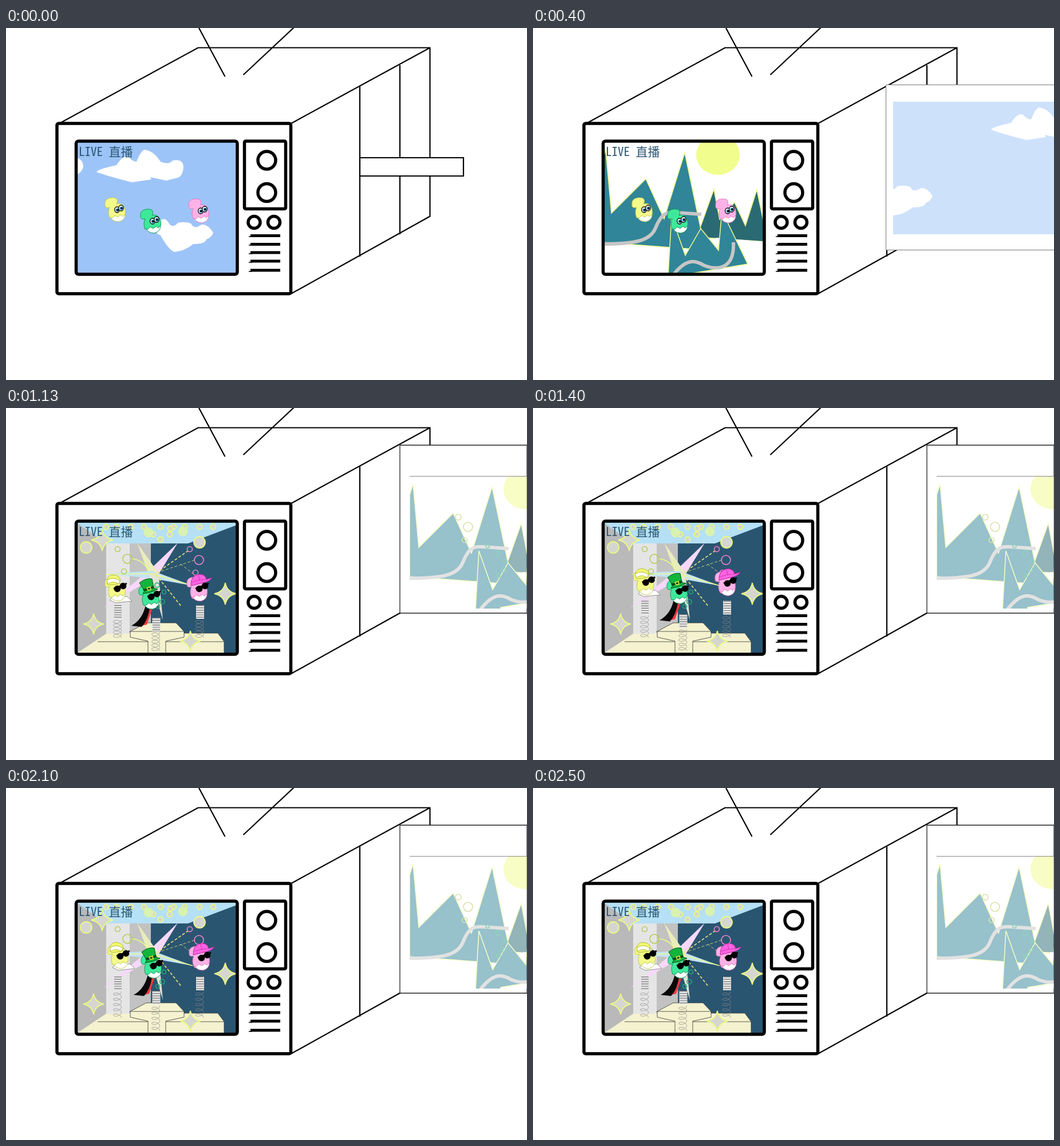
Recreate the animation shown at these times as an HTML page. Size 910 by 616 pixels, loop 2.77 s.

```html
<!DOCTYPE html>
<html lang="zh">
<head>
<meta charset="utf-8">
<title>Live television</title>
<style>
html, body { margin: 0; width: 100%; height: 100%; overflow: hidden; background: #fff; }
svg { display: block; }
text { font: 21px "Noto Sans Mono CJK SC", "Noto Sans CJK SC", "Noto Sans CJK", monospace; fill: #2a5571; white-space: pre; }
.line { fill: none; stroke: #000; stroke-width: 2.2; }
.bold { fill: #fff; stroke: #000; stroke-width: 5.5; stroke-linejoin: round; }
.teal { fill: #318598; stroke: #f1fd8c; stroke-width: 1.5; }
.road { fill: none; stroke: #c6c6c6; stroke-width: 6; }
.cream { fill: #f4f2cf; stroke: #333; stroke-width: .8; }
.glow { fill: #d6d6d0; stroke: #eafa80; stroke-width: 1.8; }
.dash { fill: none; stroke: #eee878; stroke-width: 1.6; stroke-dasharray: 5 3; }
</style>
</head>
<body>
<svg width="910" height="616" viewBox="0 0 910 616">
<defs>
  <clipPath id="glass"><path d="M121 199H405V431H121Z"/></clipPath>
  <g id="sky" clip-path="url(#glass)" fill="#fff">
    <path fill="#9dc4f8" d="M121 199H405V431H121Z"/>
    <path id="edge" d="M121 226Q135 230 135 243Q133 252 121 259Z"/>
    <path id="high" d="M158 252Q160 247 193 240Q205 221 214 226Q222 234 228 234Q238 208 246 214Q258 216 270 234Q284 240 291 232Q310 228 310 244Q308 260 300 262L280 267L252 261L254 265L220 270Q180 260 158 252Z"/>
    <path id="low" d="M268 338Q278 328 286 344Q293 350 300 341Q312 338 323 342Q328 353 340 345Q350 340 362 358Q360 366 350 370Q348 378 327 378Q313 390 294 392Q284 388 270 363Q255 358 268 338Z"/>
  </g>
  <g id="hills" clip-path="url(#glass)">
    <path fill="#fff" d="M121 199H405V431H121Z"/>
    <ellipse cx="323" cy="222" rx="38" ry="35" fill="#f1fd8c"/>
    <path class="teal" style="fill:#2a6b73" d="M286 366L316 282L326 335L352 305L371 346L391 283L405 350V374Z"/>
    <path class="teal" d="M121 232L127 213L137 324L197 264L229 334L265 218L296 366L293 388L121 375Z"/>
    <path fill="#fff" d="M238 385L293 388L320 367L405 374V431H121V376Z"/>
    <path class="road" d="M121 378C180 378 205 372 214 350C225 322 235 322 250 323L294 326"/>
    <path class="teal" d="M236 434L242 330L266 398L293 351L324 389L330 320L375 413L280 429V434Z"/>
    <path class="road" d="M245 432C270 400 285 408 300 416C325 425 352 420 350 375"/>
    <g id="extras">
      <path fill="#93c69c" stroke="#eafa80" d="M357 386L360 376Q384 371 398 382H405V408H372L364 394Z"/>
      <path fill="#2f9455" stroke="#eafa80" d="M360 376L378 375L379 384L359 384ZM382 375Q393 376 398 384H383Z"/>
      <circle cx="399" cy="401" r="7" fill="#1f8044" stroke="#175c33"/>
      <g id="hillBubbles" fill="none" stroke-width="1.7"></g>
    </g>
  </g>
</defs>

<g class="line">
  <path d="M95 166L335.500 34.500H740.500V329.500L498 465M498 167L740.500 34.500M618 102V400M337 0L382.500 85M503 -1L414.500 82"/>
  <path id="seam" d="M688 65V361"/>
  <path id="bar" fill="#fff" d="M618 227H799V259H618Z"/>
</g>
<g id="skyPanel">
  <path fill="#fff" stroke="#777" d="M616.5 99.5H911V388.500H616.500Z"/>
  <use href="#sky" x="508" y="-70" opacity=".5"/>
</g>
<g id="hillPanel">
  <path fill="#fff" stroke="#222" stroke-width="1.3" d="M688 65H910V359H688Z"/>
  <use href="#hills" x="584" y="-80" opacity=".5"/>
  <path stroke="#888" d="M705 119.500H910"/>
</g>

<rect class="bold" x="89" y="167" width="408.500" height="298" rx="3"/>
<use id="skyView" href="#sky"/>
<use id="hillView" href="#hills"/>
<g id="stage" clip-path="url(#glass)">
  <path fill="#2a5571" d="M121 199H405V431H121Z"/>
  <path fill="#c2c2c2" d="M121 199H253V431H121Z"/>
  <path fill="#b9b9b9" d="M121 199L175 236V396L121 430Z"/>
  <path fill="#e5e5e5" d="M175 230H216V396H175Z"/>
  <path fill="#b5e0f5" d="M121 199H405V204L318 237H175Z"/>
  <path class="cream" style="stroke:none" d="M121 431L175 395H370L381 409V431Z"/>
  <path class="cream" d="M215 392L245 376H297L311 391V394H370L381 409V431M160 409H381"/>
  <path class="cream" d="M217 391H311V401L279 408V431H248V408L217 401Z"/>
  <path fill="#f6d8fa" d="M250 284L300 236L266 292L170 350Z"/>
  <path fill="#e9edbb" d="M229 236L265 287L250 293Z"/>
  <path fill="#c3e3fa" d="M174 290L256 285L326 311L254 298Z"/>
  <path fill="#e2e4d4" d="M250 290L266 286L274 371Z"/>
  <path fill="none" stroke="#eafa80" stroke-width="1.7" d="M218 264Q238 264 250 285M174 291L255 290L326 311"/>
  <path class="dash" d="M262 289L318 250M262 292L307 348"/>
  <path class="dash" style="stroke-width:.8" d="M264 288L330 266M305 273L327 290"/>
  <g id="lamps"></g>
  <g id="stageBubbles" fill="none" stroke-width="1.6"></g>
  <g id="springs"></g>
  <g id="band"></g>
</g>
<g id="swimmers"></g>
<text x="127" y="224">LIVE 直播</text>
<rect class="bold" style="fill:none" x="122.500" y="198" width="281.500" height="233" rx="4"/>
<rect class="bold" x="416.500" y="198" width="72" height="118.500" rx="2"/>
<path stroke="#000" stroke-width="5" d="M427 363.500H479M427 378.500H479M427 393H479M427 408H479M427 424H479"/>
<path stroke="#000" stroke-width="1.500" d="M424 365H430M424 380H430M424 395H430M424 410H430M424 426H430"/>
<g id="knobs"></g>
</svg>
<script>
const $ = id => document.getElementById(id);
const circle = (x, y, r, attrs) => `<circle cx="${x}" cy="${y}" r="${r}" ${attrs}/>`;
const path = (d, attrs) => `<path d="${d}" ${attrs}/>`;
const rings = (color, list) => list.map(c => circle(...c, `stroke="${color}"`)).join('');

const LIME = '#b5cc5a', PINK = '#ee82cc', GREEN = '#22a878';
const cast = [
  { fill: '#f3f98a', edge: '#c3cc50', swim: [0, 0], perch: [0, -1], hop: [5, -22], spring: [195.5, 345, 405, 15],
    hat: path('M177 309Q174 296 185 293Q199 293 200 303L196 309L179 311Z', 'fill="#f3f870" stroke="#b5bc40"') +
         path('M176 303Q186 295 199 303L197 309Q187 302 178 309Z', 'fill="#fff" stroke="#b5bc40"'),
    collar: path('M181 337L188 331H212L220 339L191 342Z', 'fill="#fff" stroke="#777" stroke-width=".8"') },
  { fill: '#3ee89a', edge: '#129a58', swim: [62, 20], perch: [59, 13], hop: [4, -19], spring: [262.5, 367, 428, 12],
    hat: path('M174 293Q185 284 196 286L199 302L206 304Q193 311 180 312L183 307Z', 'fill="#12b53c" stroke="#064d1b"') +
         path('M180 304L199 298L200 302L182 308Z', 'fill="#064d1b"') +
         path('M187 302L193 300L194 305L189 306Z', 'fill="none" stroke="#f2e644" stroke-width="1.500"'),
    collar: path('M185 332L196 340L187 366L179 368Z', 'fill="#f0393c"') +
            path('M160 368Q180 357 185 331L192 338Q188 360 178 370Z', 'fill="#080808"') },
  { fill: '#fcb2e6', edge: '#e57bc4', swim: [146, 2], perch: [143, -1], hop: [4, -19], spring: [339, 345, 405, 15],
    hat: path('M180 312Q179 295 193 292Q205 291 207 301L217 298Q213 304 205 306Z', 'fill="#ff62e2" stroke="#b52a9c"') +
         path('M181 306Q193 301 207 301M193 292L195 303', 'fill="none" stroke="#b52a9c" stroke-width=".7"'),
    collar: circle(184, 332, 2.5, 'fill="#fcb2e6" stroke="#e57bc4"') }
];

const eye = (x, y) => `<ellipse cx="${x}" cy="${y}" rx="4.300" ry="5" fill="#fff" stroke="#000" stroke-width="1.300"/>` +
  circle(x + .5, y + .5, 3, 'fill="#38a5dc"') + circle(x + 1, y + .5, 1.9, 'fill="#000"');
const eyes = eye(194, 318) + eye(201, 315);
const shades = path('M188 317L211 308', 'stroke="#000" stroke-width="2.500"') +
  circle(194.500, 317.500, 5.800, '') + circle(204.500, 312.500, 5.800, '');

const head = ({ fill, edge }) =>
  path('M182 328Q184 339 197 339Q209 336 208 324Z', `fill="#fff" stroke="${edge}"`) +
  path('M181 332Q177 322 181 314Q172 316 173 309C172 299 180 297 187 297C195 297 196 303 193 308C204 304 210 316 208 326L204 330L200 327L195 331L190 328L186 332Z',
    `fill="${fill}" stroke="${edge}"`);

const move = ([x, y]) => `translate(${x} ${y})`;
$('swimmers').innerHTML = cast.map(c => `<g transform="${move(c.swim)}">${head(c)}${eyes}</g>`).join('');
$('band').innerHTML = cast.map(c => `<g>${c.collar}${head(c)}${shades}${c.hat}</g>`).join('');
$('springs').innerHTML = cast.map(() => path('', 'fill="none" stroke="#888" stroke-width=".7"') +
  path('', 'stroke="#e6e6e6" stroke-width="14"') + path('', 'stroke="#777" stroke-width="13" stroke-dasharray="1.200 2.900"')).join('');

$('hillBubbles').innerHTML = rings(LIME, [[206, 271, 5], [223, 288, 8], [217, 311, 4.5]]) +
  rings(PINK, [[332, 271, 5], [348, 290, 8]]) +
  rings(GREEN, [[257, 322, 3], [276, 334, 4.5], [288, 348, 3], [285, 363, 4], [276, 373, 3]]);
$('stageBubbles').innerHTML = rings(LIME, [[195, 247, 4.5], [212, 264, 8], [206, 286, 4.5]]) +
  rings(PINK, [[321, 247, 4.5], [337, 266, 8], [331, 288, 4.5]]) +
  rings(GREEN, [[264, 310, 4], [276, 322, 3.5], [273, 339, 4], [265, 347, 3.5]]);

const star = ([x, y, r]) =>
  path(`M${x} ${y - r}Q${x + 3} ${y - 3} ${x + r} ${y}Q${x + 3} ${y + 3} ${x} ${y + r}Q${x - 3} ${y + 3} ${x - r} ${y}Q${x - 3} ${y - 3} ${x} ${y - r}Z`, 'class="glow"');
$('lamps').innerHTML =
  [175, 193, 218, 241, 270, 293, 312, 338, 362].map(x => circle(x, 208, 4.5, 'class="glow"')).join('') +
  [[257, 221], [270, 230], [286, 221], [287, 211]].map(p => circle(...p, 4.5, 'class="glow"')).join('') +
  [[249, 218], [309, 216]].map(p => circle(...p, 8.5, 'fill="#d9f2b0"')).join('') +
  [[140, 244], [338, 235]].map(p => circle(...p, 10, 'class="glow"')).join('') +
  [[168, 231, 19], [153, 378, 18], [383, 325, 19], [322, 408, 18]].map(star).join('');
$('knobs').innerHTML = [[455.5, 231.5, 15.5], [455.5, 288, 15.5], [433.5, 340, 10.5], [468, 340, 10.5]]
  .map(k => circle(...k, 'class="bold"')).join('');

function coil(x, top, bottom) {
  let d = '';
  for (let i = 0; i <= 80; i++) {
    const a = i / 80 * Math.PI * 10;
    const y = top + (bottom - top - 5) * i / 80 + 4 * Math.sin(a) + 2;
    d += `${i ? 'L' : 'M'}${(x + 7 * Math.cos(a)).toFixed(1)} ${y.toFixed(1)}`;
  }
  return d;
}

function pose(lift) {
  cast.forEach((c, i) => {
    const [x, y, floor, rise] = c.spring, top = y - rise * lift;
    const [wire, block, bars] = [...$('springs').children].slice(i * 3, i * 3 + 3);
    wire.setAttribute('d', coil(x - 1, top + 24, floor));
    block.setAttribute('d', `M${x} ${top}v24`);
    bars.setAttribute('d', `M${x} ${top}v24`);
    $('band').children[i].setAttribute('transform', move(c.perch.map((p, k) => p + c.hop[k] * lift)));
  });
}

const LOOP = 2770;
const beats = [[1130, 0], [1400, .5], [1700, 0], [1970, .5], [2100, 1], [2370, .5], [2500, 1]];
const show = (on, ...ids) => ids.forEach(id => $(id).style.display = on ? '' : 'none');

function draw() {
  const t = performance.now() % LOOP;
  const sky = t < 400, stage = t >= 1130, hills = !sky && !stage;
  show(sky, 'skyView');
  show(hills, 'hillView', 'skyPanel');
  show(stage, 'stage', 'hillPanel');
  show(!stage, 'swimmers', 'bar', 'seam');
  show(t < 200, 'edge');
  show(t >= 630, 'extras');
  $('high').setAttribute('transform', move(t < 200 ? [0, 0] : [134, -4]));
  $('low').setAttribute('transform', move(t < 200 ? [0, 0] : [-172, 6]));
  if (stage) pose(beats.filter(b => b[0] <= t).pop()[1]);
  requestAnimationFrame(draw);
}
draw();
</script>
</body>
</html>
```
